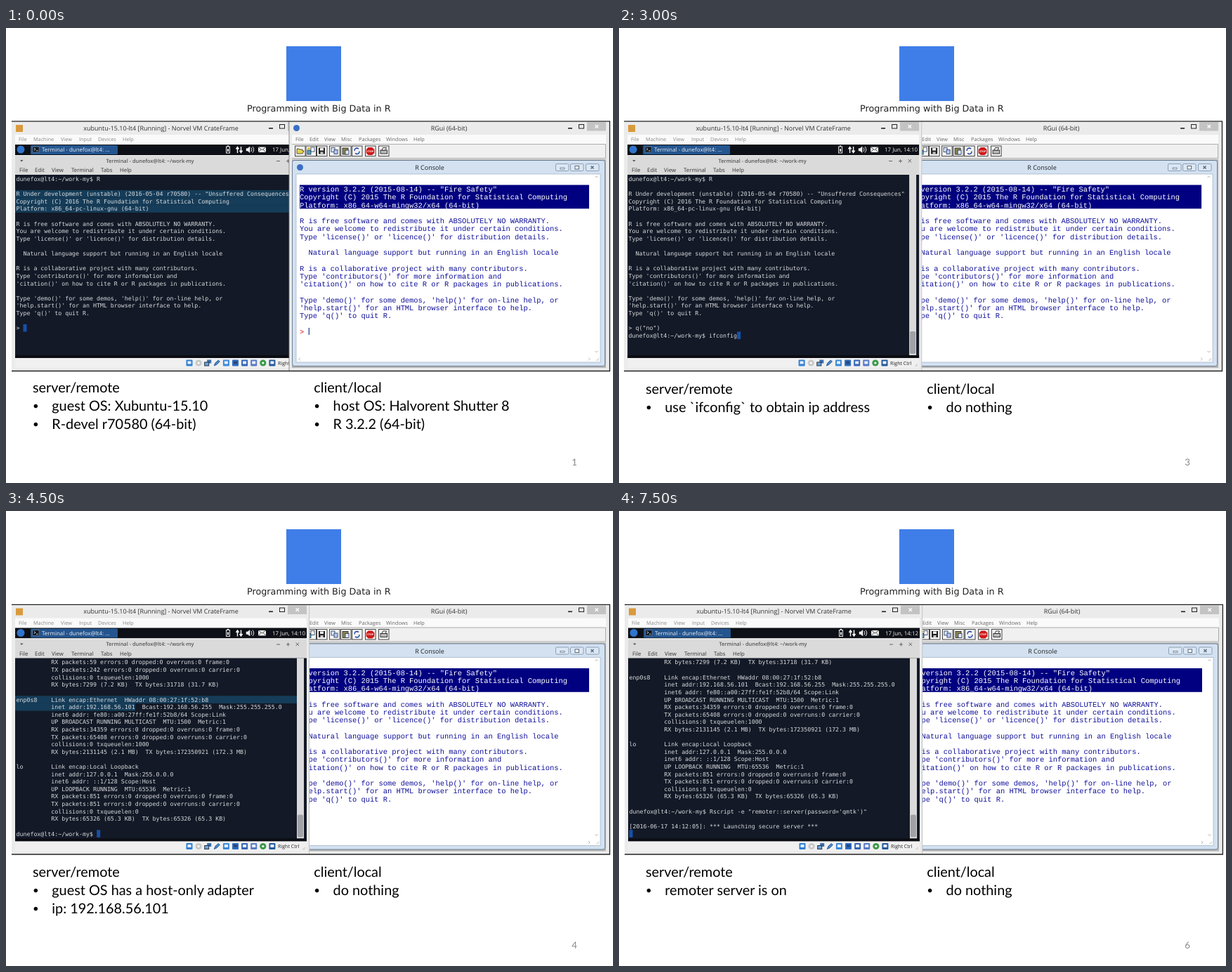
These frames come from a looping animation (864 px wide and 648 px high, 8000 ms). An HTML page:

```html
<!DOCTYPE html>
<html lang="en">
<head>
<meta charset="utf-8">
<title>Remote R session slides</title>
<style>
  html, body { margin: 0; width: 100%; height: 100%; overflow: hidden; background: #fff; }
  svg { display: block; width: 864px; height: 648px; }
  text { white-space: pre; text-rendering: geometricPrecision; }
  .ui { font-family: "Open Sans", "Noto Sans", sans-serif; }
  .slide { font-family: Lato, sans-serif; }
  .term { font-family: "DejaVu Sans Mono", monospace; }
  .console { font-family: "Liberation Mono", monospace; }
  .logo { font-family: "DejaVu Sans", sans-serif; }
</style>
</head>
<body>
<svg id="stage" viewBox="0 0 864 648"></svg>
<script>
const PROMPT = 'dunefox@lt4:~/work-my$ ';
const SERVE = `Rscript -e "remoter::server(password='qmtk')"`;

// Shape helpers; text is placed by the middle of its capitals.
const rect = (x, y, w, h, fill, extra = '') =>
  `<rect x="${x}" y="${y}" width="${w}" height="${h}" fill="${fill}" ${extra}/>`;
const dot = (x, y, r, fill) => `<circle cx="${x}" cy="${y}" r="${r}" fill="${fill}"/>`;
const path = (d, stroke, width = 1, fill = 'none') =>
  `<path d="${d}" stroke="${stroke}" stroke-width="${width}" fill="${fill}"/>`;
const text = (x, y, str, size, fill, cls = 'ui', extra = '') =>
  `<text x="${x}" y="${y + size * 0.36}" font-size="${size}" fill="${fill}" class="${cls}" ${extra}>${str}</text>`;
const centred = 'text-anchor="middle"';
const menu = (items, y, size, fill) =>
  items.map(([x, label]) => text(x, y, label, size, fill)).join('');

const license = [
  'R is free software and comes with ABSOLUTELY NO WARRANTY.',
  'You are welcome to redistribute it under certain conditions.',
  "Type 'license()' or 'licence()' for distribution details.",
  '',
  '  Natural language support but running in an English locale',
  '',
  'R is a collaborative project with many contributors.',
  "Type 'contributors()' for more information and",
  "'citation()' on how to cite R or R packages in publications.",
  '',
  "Type 'demo()' for some demos, 'help()' for on-line help, or",
  "'help.start()' for an HTML browser interface to help.",
  "Type 'q()' to quit R.",
  ''
];

const session = [
  PROMPT + 'R',
  '',
  'R Under development (unstable) (2016-05-04 r70580) -- "Unsuffered Consequences"',
  'Copyright (C) 2016 The R Foundation for Statistical Computing',
  'Platform: x86_64-pc-linux-gnu (64-bit)',
  '',
  ...license
];

const packets = (rx, tx, queue, bytes) => [
  `RX packets:${rx} errors:0 dropped:0 overruns:0 frame:0`,
  `TX packets:${tx} errors:0 dropped:0 overruns:0 carrier:0`,
  `collisions:0 txqueuelen:${queue}`,
  bytes
];
const adapter = (name, lines) =>
  [...lines.map((line, i) => (i ? '' : name).padEnd(10) + line), ''];

const ifconfig = [
  ...adapter('', packets(59, 242, 1000, 'RX bytes:7299 (7.2 KB)  TX bytes:31718 (31.7 KB)')),
  ...adapter('enp0s8', [
    'Link encap:Ethernet  HWaddr 08:00:27:1f:52:b8',
    'inet addr:192.168.56.101  Bcast:192.168.56.255  Mask:255.255.255.0',
    'inet6 addr: fe80::a00:27ff:fe1f:52b8/64 Scope:Link',
    'UP BROADCAST RUNNING MULTICAST  MTU:1500  Metric:1',
    ...packets(34359, 65408, 1000, 'RX bytes:2131145 (2.1 MB)  TX bytes:172350921 (172.3 MB)')
  ]),
  ...adapter('lo', [
    'Link encap:Local Loopback',
    'inet addr:127.0.0.1  Mask:255.0.0.0',
    'inet6 addr: ::1/128 Scope:Host',
    'UP LOOPBACK RUNNING  MTU:65536  Metric:1',
    ...packets(851, 851, 0, 'RX bytes:65326 (65.3 KB)  TX bytes:65326 (65.3 KB)')
  ])
];

const FULL = 401;
const idle = ['do nothing'];
const slides = [
  { clock: '14:09', lines: [...session, '> '], consoleFront: true,
    selection: { row: 2, widths: [FULL, FULL, FULL] },
    server: ['guest OS: Xubuntu-15.10', 'R-devel r70580 (64-bit)'],
    client: ['host OS: Halvorent Shutter 8', 'R 3.2.2 (64-bit)'] },
  { clock: '14:09', lines: [...session, '> q("no")'],
    server: ['just normally quit R', 'go back to command line'], client: idle },
  { clock: '14:10', lines: [...session, '> q("no")', PROMPT + 'ifconfig'], dx: -0.9,
    server: ['use `ifconfig` to obtain ip address'], client: idle },
  { clock: '14:10', lines: [...ifconfig, PROMPT], dy: 0.5,
    selection: { row: 5, widths: [FULL, 171] },
    server: ['guest OS has a host-only adapter', 'ip: 192.168.56.101'], client: idle },
  { clock: '14:11', lines: [...ifconfig, PROMPT + SERVE], dy: 0.5,
    server: ['lunch remote R server', 'with password protection', 'password: qmtk'], client: idle },
  { clock: '14:12', dy: 0.5,
    lines: [...ifconfig.slice(3), PROMPT + SERVE, '',
      '[2016-06-17 14:12:05]: *** Launching secure server ***', ''],
    server: ['remoter server is on'], client: idle }
];

function titleBar(x, right, title, middle) {
  return rect(x, 133, right - x, 19, '#ebebeb')
    + text(middle, 142.5, title, 9, '#333', 'ui', centred)
    + rect(right - 59, 142, 6, 1.6, '#222')
    + rect(right - 43.5, 137.5, 7, 5.5, 'none', 'stroke="#222"')
    + rect(right - 32, 134, 27, 12.5, '#c3c3c3')
    + path(`M${right - 20.5} 138l4.5 4.5m0-4.5l-4.5 4.5`, '#fff', 1.2);
}

function terminal({ lines, selection = { row: 0, widths: [] } }) {
  const pitch = 10.61, top = 215, left = 14.5, charWidth = 4.985;
  const last = lines.length - 1;
  const rowTop = row => top + (row - 0.5) * pitch;
  return rect(13, 209, 415, 261, '#131926')
    + selection.widths.map((w, i) => rect(13, rowTop(selection.row + i), w, pitch + 0.1, '#153c58')).join('')
    + rect(left + lines[last].length * charWidth, rowTop(last), 5, pitch, '#1850a8')
    + lines.map((line, i) => text(left, top + i * pitch, line, 8.28, '#d8dadd', 'term')).join('')
    + rect(414, 209, 10, 257, '#dadada') + rect(415, 432, 8, 32, '#a0a2a6', 'rx="2"')
    + rect(13, 466, 415, 4, '#0b0d13');
}

function statusIcons() {
  const colors = ['#2f7fd6', '#c9c9c9', '#3a6fae', '#4a86c8', '#3c8ad8', '#2e6cc0', '#3565b8', '#5a78c8', '#3c9a48', '#245a9a'];
  return colors.map((color, i) => {
    const x = 261 + i * 13.1;
    if (i === 1 || i === 8) return dot(x, 477, 4.6, color) + dot(x, 477, 1.6, '#fff');
    if (i === 3) return path(`M${x - 4} 481l1.5-4l4.5-4l2 2l-4.5 4.5z`, '#2f5f98', 1, color);
    if (i === 2) return rect(x - 1, 472.5, 6, 5, color) + rect(x - 4.5, 476, 6, 5, '#6fa3dc', 'stroke="#234"');
    return rect(x - 4.5, 472.5, 9, 9, color, 'rx="1"') + rect(x - 2.5, 474.5, 5, 4, i === 5 ? '#234a80' : '#e8f1fb');
  }).join('');
}

function machineWindow(slide) {
  return rect(8, 133, 424, 355, '#ebebeb')
    + titleBar(8, 433, 'xubuntu-15.10-lt4 [Running] - Norvel VM CrateFrame', 220.5)
    + rect(14, 138, 10, 10, '#d99a3c')
    + rect(13, 152, 415, 14, '#fafafa')
    + menu([[18, 'File'], [39, 'Machine'], [78, 'View'], [104, 'Input'], [131, 'Devices'], [166, 'Help']], 158.5, 7.3, '#8a8a8a')
    // Desktop panel
    + rect(13, 166, 415, 15, '#0d1016')
    + dot(21, 173, 5.5, '#2f74cc')
    + rect(35, 167, 124, 13, '#24558f', 'rx="1.5"')
    + rect(38, 169, 9, 8, '#111820', 'stroke="#7d8fa6" stroke-width=".6"')
    + path('M40 171l2 1.6l-2 1.6m3 .6h2.5', '#fff', 0.8)
    + text(51, 173.3, 'Terminal - dunefox@lt4: ...', 7.95, '#f2f2f2')
    + rect(313.5, 169, 5, 9, 'none', 'stroke="#eee"') + rect(315, 167.3, 2, 1.5, '#eee') + rect(315, 172, 2, 4, '#eee')
    + path('M329.5 178v-8m-2 2.5l2-3l2 3M334.5 169v8m-2-2.5l2 3l2-3', '#fff', 1.4)
    + path('M342 171.5h2l3-2.5v8.5l-3-2.5h-2z', '#eee', 0.5, '#eee')
    + path('M349 170.5q2 2.7 0 5.5m2-7q3.5 4.3 0 8.5', '#eee')
    + rect(359, 169.5, 11, 7.5, '#f2f2f2') + path('M359 169.5l5.5 4l5.5-4m-11 7.5l4-4m7 4l-4-4', '#222', 0.8)
    + text(379, 173.3, '17 Jun, ' + slide.clock, 7.9, '#f2f2f2')
    // Terminal window
    + rect(13, 181, 415, 28, '#dadada') + rect(13, 181, 415, 1, '#f5f5f5')
    + path('M20 188h4.5l-2.2 2.6z', 'none', 0, '#555')
    + text(205, 189.3, 'Terminal - dunefox@lt4: ~/work-my', 7.4, '#555', 'ui', centred + ' font-weight="600"')
    + path('M385 189.5h5M399 189.5h5m-2.5-2.5v5M412.5 187l4.5 4.5m0-4.5l-4.5 4.5', '#666')
    + menu([[19, 'File'], [41, 'Edit'], [65, 'View'], [93, 'Terminal'], [135, 'Tabs'], [162, 'Help']], 202.5, 7.8, '#333')
    + terminal(slide)
    // Status bar
    + rect(13, 470, 415, 14, '#f0f0f0') + statusIcons()
    + path('M379 475v3', '#fff') + text(387, 477.3, 'Right Ctrl', 7.1, '#222')
    + path('M422 482l4-4m-2 4l2-2', '#b5b5b5', 0.8)
    + rect(431.3, 133, 0.8, 355, '#bdbdbd');
}

function toolbar() {
  const buttons = [411, 426.5, 442, 460, 476, 492, 511, 530];
  const page = (x, y, fill) => rect(x, y, 5, 6, fill, 'stroke="#235" stroke-width=".8"');
  return buttons.map(x => rect(x + 0.5, 168, 14.5, 14.5, '#f4f4f4', 'stroke="#444"')).join('')
    + path('M414 179v-7h3l1 1h4v2h2l-2 4z', '#333', 0.8, '#e6d34a')
    + page(429, 174, '#5aa0b8') + page(434, 170, '#fff') + rect(429, 170, 4, 3, '#e0c840')
    + rect(445, 170.5, 9, 9, '#222') + rect(447, 171, 5, 3.5, '#eee') + rect(447.5, 176.5, 4, 3, '#ccc')
    + page(463, 170.5, '#dfe9ff') + page(467, 173.5, '#b8c8f4')
    + rect(479, 171, 8, 9, '#8a8450', 'stroke="#222" stroke-width=".8"') + page(483, 174, '#dfe9ff')
    + path('M496 175q0-4 4-4l2 1m1 3.5q0 4-4 4l-2-1', '#2448a8', 1.4)
    + path('M515.7 170h5.6l3 3v5l-3 3h-5.6l-3-3v-5z', 'none', 0, '#d01818')
    + text(518.5, 175.5, 'STOP', 3.6, '#fff', 'ui', centred + ' font-weight="700"')
    + rect(533, 174, 9.5, 5, '#bbb', 'stroke="#222" stroke-width=".9"')
    + path('M535 174l1.5-3.5h5l-1.5 3.5z', '#222', 0.9, '#fff');
}

function consoleWindow() {
  const header = [
    'R version 3.2.2 (2015-08-14) -- "Fire Safety"',
    'Copyright (C) 2015 The R Foundation for Statistical Computing',
    'Platform: x86_64-w64-mingw32/x64 (64-bit)'
  ];
  const lines = [...header, '', ...license];
  const pitch = 11.25, top = 229.5;
  return rect(403, 133, 456, 355, '#ebebeb')
    + titleBar(403, 859, 'RGui (64-bit)', 630.5)
    + dot(413.5, 142.5, 4.5, '#3a6fc4')
    + rect(407, 152, 447, 14, '#fafafa')
    + menu([[412, 'File'], [432, 'Edit'], [453, 'View'], [477, 'Misc'], [502, 'Packages'], [541, 'Windows'], [580, 'Help']], 158.5, 7.3, '#666')
    + rect(407, 166, 447, 20, '#f0f0f0') + toolbar()
    + path('M407 165.5h446.5v20H407', '#9a9a9a', 0.8)
    + rect(407, 187, 447, 297, '#b4b4b4')
    // Inner console window
    + rect(407.5, 188.5, 445, 293, '#d3e1f1', 'stroke="#6f8196" rx="3"')
    + dot(418.5, 198.5, 4.5, '#3a6fc4')
    + text(603, 198.8, 'R Console', 9, '#222', 'ui', centred)
    + [782.5, 803.5, 825.5].map(x => rect(x, 193.5, 18.5, 10, '#dbe7f4', 'rx="1.5" stroke="#8c9fb5"')).join('')
    + rect(789, 199, 6, 2, '#fff', 'stroke="#55657a" stroke-width=".7"')
    + rect(810, 196.5, 5.5, 4.5, '#fff', 'stroke="#55657a"')
    + path('M832.5 196.5l4 4m0-4l-4 4', '#55657a', 1.3)
    + rect(413, 208, 433, 268, '#fff', 'stroke="#9fb0c4" stroke-width=".7"')
    + rect(418, 223.5, 412, 33.8, '#000080')
    + lines.map((line, i) => text(418, top + i * pitch, line, 10.41, i < 3 ? '#fff' : '#10109a', 'console')).join('')
    + text(418, top + 18 * pitch, '&gt;', 10.41, '#d01010', 'console')
    + rect(430.7, 427, 1.2, 10, '#1a3a8a')
    + path('M838.5 213l2-2l2 2M838.5 460l2 2l2-2M419 469.5l-2 2l2 2M829 469.5l2 2l-2 2', '#aaa', 0.9)
    + path('M840 474l4-4m-2 4l2-2', '#bbb', 0.8);
}

function bullets(x, heading, items, y) {
  const line = (left, i, str, size = 19.85) => text(left, y + i * 26.2, str, size, '#000', 'slide');
  return line(x, 0, heading)
    + items.map((item, i) => line(x, i + 1, '•', 15) + line(x + 27.3, i + 1, item)).join('');
}

function draw(index) {
  const slide = slides[index];
  const windows = [consoleWindow(), machineWindow(slide)];
  if (slide.consoleFront) windows.reverse();
  const textY = slide.consoleFront ? 511.5 : 513.5;
  return rect(0, 0, 864, 648, '#fff')
    + rect(399, 26, 78, 78, '#3f7ee8')
    + text(343, 114.8, 'Programming with Big Data in R', 12.75, '#222', 'logo')
    + `<g transform="translate(${slide.dx || 0} ${slide.dy || 0})">`
    + windows.join('')
    + (slide.consoleFront ? rect(402.6, 133, 0.8, 355, '#777') : '')
    + path('M8 132.8H859.4V488.5H8', '#222', 1.3)
    + '</g>'
    + bullets(38, 'server/remote', slide.server, textY)
    + bullets(438.3, 'client/local', slide.client, textY)
    + text(809, 618.5, index + 1, 13.3, '#898989', 'slide', centred);
}

const stage = document.getElementById('stage');
let shown = -1;
function tick() {
  const index = Math.floor(performance.now() % 8000 / 1500);
  if (index !== shown) stage.innerHTML = draw(shown = index);
  requestAnimationFrame(tick);
}
tick();
</script>
</body>
</html>
```
